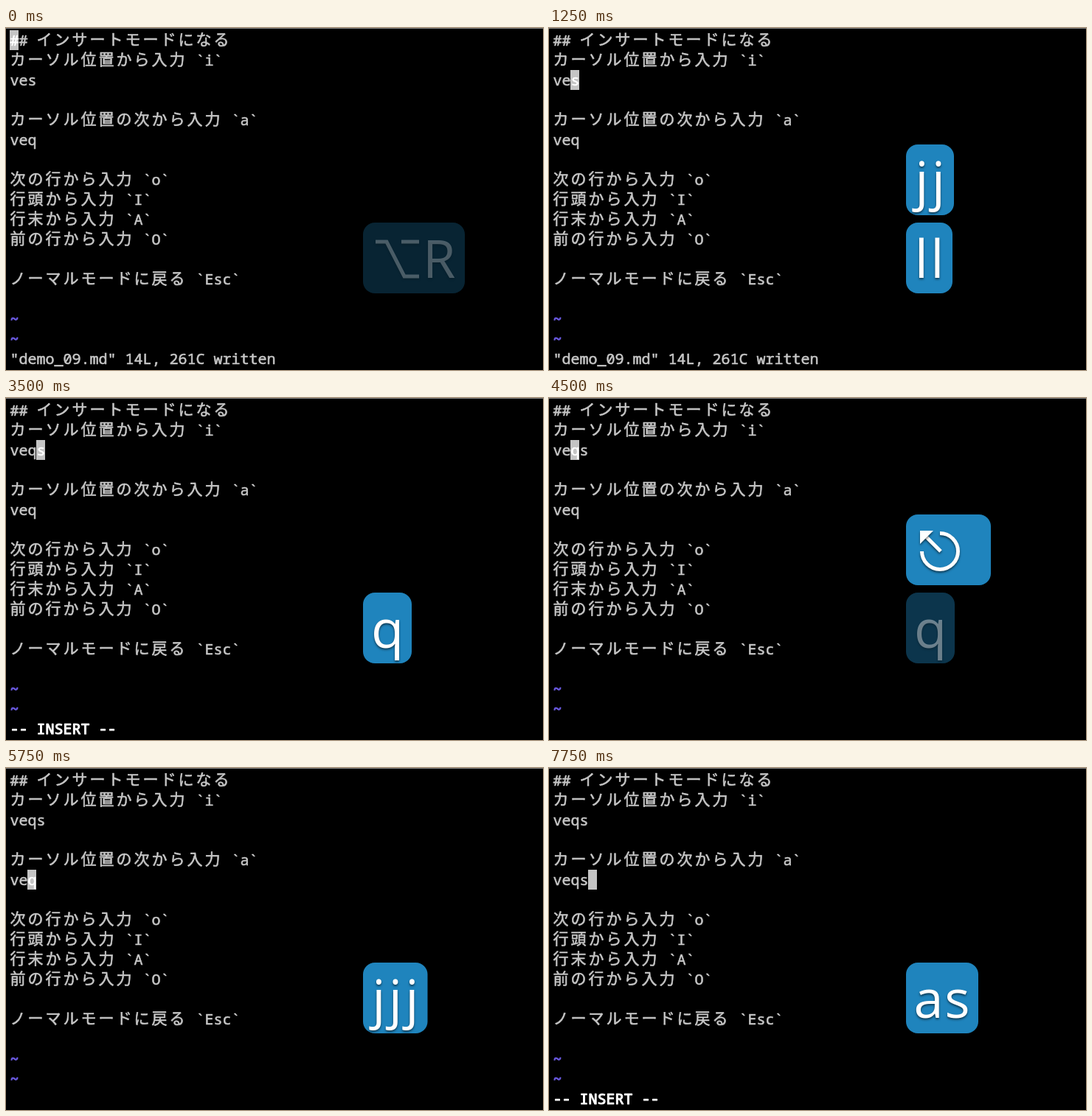
These frames come from a looping animation (728x464 px, 8 s). An HTML page with a canvas:

```html
<!DOCTYPE html>
<html lang="ja">
<head>
<meta charset="utf-8">
<style>
  html, body { margin: 0; width: 100%; height: 100%; overflow: hidden; background: #000; }
  canvas { display: block; }
</style>
</head>
<body>
<canvas id="stage" width="728" height="464"></canvas>
<script>
const ctx = document.getElementById('stage').getContext('2d');
const LOOP = 8000, TICK = 250;
const CELL = 12, ROW = 27, LEFT = 5.5;
const GRAY = '#c7c7c7', VIOLET = '#6a5ae0';
const LATIN = '20px "Noto Sans Mono", monospace';
const KANA = '21px "Noto Sans CJK JP", "Noto Sans CJK", sans-serif';
const MEDIUM = 0.6, BOLD = 1.1; // outline added to the glyphs, in pixels

// [time, row, column]
const cursorMoves = [
  [0, 0, 0], [250, 1, 0], [500, 2, 0], [1000, 2, 1], [1250, 2, 2],
  [3500, 2, 3], [4500, 2, 2], [5250, 5, 2], [7250, 5, 3], [7500, 5, 4]
];
const statusLines = [
  [0, '"demo_09.md" 14L, 261C written'], [2500, '-- INSERT --'], [4500, ''], [7250, '-- INSERT --']
];
// Key bubbles: slot 0 is the lower one, slot 1 the upper one
const bubbles = [
  { keys: '⌥', slot: 0, presses: [-1032] },
  { keys: 'jj', slot: 1, presses: [250, 500] },
  { keys: 'll', slot: 0, presses: [1000, 1250] },
  { keys: 'i', slot: 1, presses: [2300] },
  { keys: 'q', slot: 0, presses: [3500] },
  { keys: '⎋', slot: 1, presses: [4500] },
  { keys: 'jjj', slot: 0, presses: [5250, 5250, 5250] },
  { keys: 'as', slot: 0, presses: [7250, 7500] }
];
const advance = { j: 22.5, l: 21.5, i: 21.5, q: 46, a: 41, s: 37, '⌥': 118, '⎋': 95 };

const latest = (list, t) => list.filter(entry => entry[0] <= t).pop();
const isWide = ch => ch > '\u2fff';

function drawLine(text, row, { color = GRAY, weight = MEDIUM, cursorCol = -1 } = {}) {
  let col = 0;
  const top = 3 + row * ROW;
  ctx.lineWidth = weight;
  ctx.lineJoin = 'round';
  for (const ch of text) {
    const wide = isWide(ch), span = wide ? 2 : 1;
    const x = LEFT + col * CELL, y = top + (wide ? 20 : 21);
    const selected = col === cursorCol;
    if (selected) {
      ctx.fillStyle = '#c4c4c4';
      ctx.fillRect(5 + col * CELL, top, span * CELL, ROW);
    }
    ctx.font = wide ? KANA : LATIN;
    ctx.fillStyle = ctx.strokeStyle = selected ? '#fff' : color;
    ctx.fillText(ch, x, y);
    ctx.strokeText(ch, x, y);
    col += span;
  }
}

function drawOption(x, y) {
  ctx.lineWidth = 5;
  ctx.lineJoin = 'miter';
  ctx.beginPath();
  ctx.moveTo(x + 17, y + 26);
  ctx.lineTo(x + 32, y + 26);
  ctx.lineTo(x + 56, y + 73);
  ctx.lineTo(x + 76, y + 73);
  ctx.moveTo(x + 52, y + 26);
  ctx.lineTo(x + 76, y + 26);
  ctx.stroke();
  ctx.fillText('R', x + 81, y + 75);
}

function drawEscape(x, y) {
  ctx.lineWidth = 5;
  ctx.beginPath();
  ctx.arc(x + 46, y + 50, 24.5, -Math.PI / 2, Math.PI);
  ctx.moveTo(x + 47, y + 50);
  ctx.lineTo(x + 26, y + 29);
  ctx.stroke();
  ctx.beginPath();
  ctx.moveTo(x + 19, y + 22);
  ctx.lineTo(x + 37, y + 22);
  ctx.lineTo(x + 19, y + 40);
  ctx.fill();
}

function drawBubble({ keys, slot, presses }, t) {
  const done = presses.filter(p => p <= t);
  if (!done.length) return;
  const opacity = Math.min(1, (1100 - (t - done[done.length - 1])) / 250);
  if (opacity <= 0) return;
  const shown = [...keys].slice(0, done.length);
  const x = 484, y = 264 - slot * 106;
  ctx.save();
  ctx.globalAlpha = opacity;
  ctx.fillStyle = '#1f84bd';
  ctx.beginPath();
  ctx.roundRect(x, y, 20 + shown.reduce((sum, k) => sum + advance[k], 0), 96, 16);
  ctx.fill();
  ctx.fillStyle = ctx.strokeStyle = '#fff';
  ctx.shadowColor = 'rgba(0,0,0,.55)';
  ctx.shadowOffsetY = 2;
  ctx.shadowBlur = 3;
  ctx.font = '72px "Open Sans", sans-serif';
  if (keys === '⌥') drawOption(x, y);
  else if (keys === '⎋') drawEscape(x, y);
  else {
    ctx.textAlign = 'center';
    let left = x + 10;
    for (const key of shown) {
      ctx.fillText(key, left + advance[key] / 2, y + 75);
      left += advance[key];
    }
  }
  ctx.restore();
}

function draw(t) {
  const [, row, col] = latest(cursorMoves, t);
  const status = latest(statusLines, t)[1];
  const lines = [
    '## インサートモードになる',
    'カーソル位置から入力 `i`',
    t < 3500 ? 'ves' : 'veqs',
    '',
    'カーソル位置の次から入力 `a`',
    t < 7500 ? 'veq' : 'veqs',
    '',
    '次の行から入力 `o`',
    '行頭から入力 `I`',
    '行末から入力 `A`',
    '前の行から入力 `O`',
    '',
    'ノーマルモードに戻る `Esc`'
  ];
  ctx.fillStyle = '#000';
  ctx.fillRect(0, 0, 728, 464);
  ctx.fillStyle = '#808080';
  ctx.fillRect(0, 0, 728, 1);
  lines.forEach((line, i) => drawLine(line + ' ', i, { cursorCol: i === row ? col : -1 }));
  for (const i of [14, 15]) drawLine('~', i, { color: VIOLET, weight: BOLD });
  drawLine(status, 16, status[0] === '-' ? { color: '#fff', weight: BOLD } : {});
  bubbles.forEach(bubble => drawBubble(bubble, t));
}

function frame() {
  const t = performance.now() % LOOP;
  draw(Math.floor(t / TICK) * TICK);
  requestAnimationFrame(frame);
}
frame();
</script>
</body>
</html>
```
